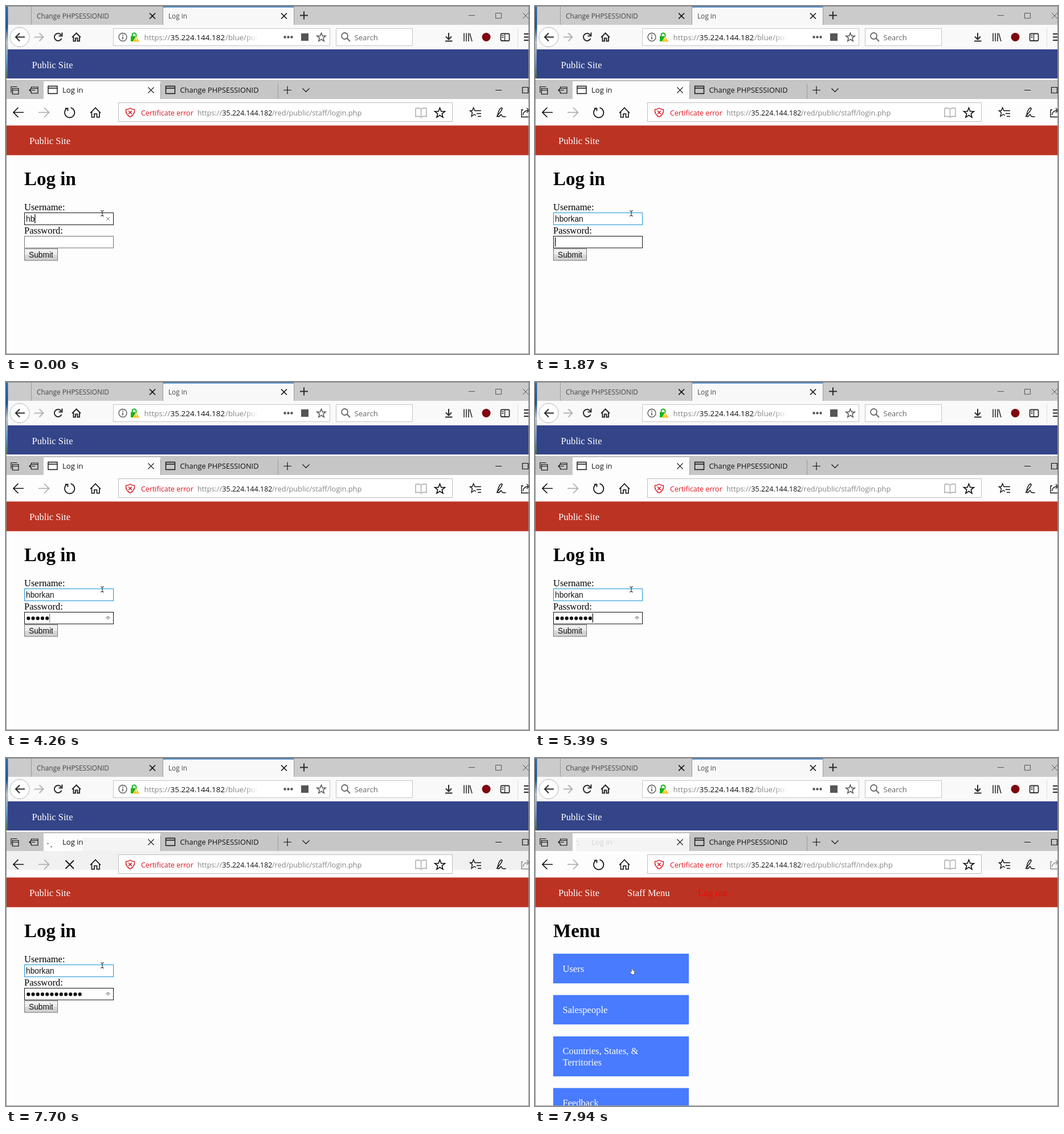
An HTML page that plays this animation: 918 px wide and 610 px high, repeating every 8 s.

```html
<!DOCTYPE html>
<html lang="en">
<head>
<meta charset="utf-8">
<title>Log in</title>
<style>
html, body { margin: 0; width: 100%; height: 100%; overflow: hidden; background: #fdfdfd; }
svg { display: block; width: 918px; height: 610px; }
text { font-family: "Open Sans", "Noto Sans", sans-serif; font-size: 12.7px; fill: #111; white-space: pre; }
.page text { font: 16.5px "Liberation Serif", serif; fill: #000; }
.page .nav, .page .nav text { fill: #fff; }
.page .h1 { font-size: 33px; font-weight: bold; }
.page .field { font: 13.75px "Liberation Sans", sans-serif; fill: #111; }
.small { font-size: 11.8px; }
.icon { fill: none; stroke: #111; stroke-width: 1.4; }
.bold { stroke-width: 2; stroke: #2b2b2b; }
.pale { stroke: #a8a8a8; }
.url { fill: #858585; }
</style>
</head>
<body>
<svg viewBox="0 0 918 610">
  <defs>
    <linearGradient id="desk" x2="0" y2="1">
      <stop stop-color="#2a6ba5"/><stop offset=".3" stop-color="#1d4f86"/>
      <stop offset=".5" stop-color="#b9c6d0"/><stop offset=".8" stop-color="#5b8fc4"/><stop offset="1" stop-color="#4c6a4a"/>
    </linearGradient>
    <linearGradient id="fade"><stop offset=".45" stop-color="#fff" stop-opacity="0"/><stop offset="1" stop-color="#fff"/></linearGradient>
    <linearGradient id="btn" x2="0" y2="1">
      <stop stop-color="#f2f2f2"/><stop offset=".5" stop-color="#ebebeb"/><stop offset=".5" stop-color="#dadada"/><stop offset="1" stop-color="#cfcfcf"/>
    </linearGradient>
    <path id="star" d="M0-9 2.4-2.9 8.9-2.8 3.8 1.3 5.5 7.6 0 4-5.5 7.6-3.8 1.3-8.9-2.8-2.4-2.9Z"/>
    <path id="cross" d="M-5-5 5 5M5-5-5 5"/>
    <path id="tabicon" d="M-8-6.5H8V6.5H-8ZM-8-3H8"/>
  </defs>

  <!-- back window -->
  <rect width="918" height="130" fill="#fcfcfc"/>
  <rect x="3" width="915" height="33" fill="#cbcbcb"/>
  <rect x="3" y="33" width="915" height="43" fill="#f9f9f9"/>
  <rect width="3.5" height="127" fill="url(#desk)"/>
  <rect x="276" y="1" width="229" height="33" fill="#f8f8f8"/>
  <rect x="276" y="0" width="229" height="2.5" fill="#2f78c4"/>
  <path d="M44.5 1V33M275.5 1V33M505.5 1V33" stroke="#9c9c9c"/>
  <text x="54" y="22" class="small" fill="#333" style="fill:#444">Change PHPSESSIONID</text>
  <text x="285" y="22" class="small" style="fill:#444">Log in</text>
  <g class="icon">
    <use href="#cross" x="257" y="17.5" stroke-width="1.7"/>
    <use href="#cross" x="488" y="17.5" stroke-width="1.7"/>
    <path d="M516 16.5H530M523 9.5V23.5" class="bold"/>
    <path d="M812 16.5H823M859.5 12.5H869.5V21.5H859.5ZM907 12 917 22M917 12 907 22" stroke="#555" stroke-width="1"/>
    <circle cx="24" cy="54.5" r="17" fill="#fff" stroke="#b5b5b5" stroke-width="1"/>
    <path d="M33 54.5H17M24 47.5 17 54.5 24 61.5" class="bold"/>
    <path d="M50 54.5H65M58.500 47.5 65.500 54.5 58.500 61.5" class="bold pale" style="stroke:#b5b5b5"/>
    <path d="M97 51A6.5 6.5 0 1 0 97.500 57M98.500 46.500V52.500H92.500" class="bold"/>
    <path d="M116 55 123.500 47.500 131 55M118.500 54V61.500H122V56.500H125.500V61.500H129V54" class="bold"/>
    <rect x="188.500" y="39.500" width="380" height="30" fill="#fff" stroke="#c6c6c6" stroke-width="1"/>
    <rect x="579.500" y="39.500" width="134" height="30" fill="#fff" stroke="#c6c6c6" stroke-width="1"/>
    <circle cx="205" cy="54.500" r="7" stroke="#555"/>
    <path d="M205 53.500V58.500M205 50V52" stroke="#555" stroke-width="1.700"/>
    <path d="M221.500 53V51A3.500 3.500 0 0 1 228.500 51V53" stroke="#16b318" stroke-width="2"/>
    <rect x="219" y="53" width="11" height="9" fill="#16b318" stroke="none"/>
    <path d="M228.500 53 234.500 63H222.500Z" fill="#ffbf00" stroke="#fff" stroke-width=".7"/>
    <path d="M228.500 56V60M228.500 61V62" stroke="#fff"/>
    <circle cx="594.500" cy="52.500" r="5.500" stroke="#666" stroke-width="1.800"/>
    <path d="M598.500 56.500 604 62" stroke="#666" stroke-width="2"/>
    <use href="#star" transform="translate(553.500 55) scale(.87)" stroke="#555" stroke-width="1.700"/>
    <path d="M777 47V58M772 53.500 777 58.500 782 53.500M771 61.500H783.500" class="bold"/>
    <path d="M804 47.500V62M808 47.500V62M812 47.500V62M814 48 818 62" stroke="#444" stroke-width="1.800"/>
    <rect x="868.500" y="48.500" width="15" height="12.500" rx="2" stroke="#333" stroke-width="1.800"/>
    <path d="M875.500 48V61M870.500 52H873.500M870.500 55H873.500" stroke="#333"/>
    <path d="M909 49H918M909 54.500H918M909 60H918" class="bold"/>
    <path d="M898.500 38V72" stroke="#dedede" stroke-width="1"/>
  </g>
  <g fill="#555"><circle cx="489.500" cy="54.500" r="2.200"/><circle cx="495.500" cy="54.500" r="2.200"/><circle cx="501.500" cy="54.500" r="2.200"/></g>
  <rect x="518" y="48" width="13" height="13" fill="#555"/>
  <circle cx="843" cy="54.500" r="7.500" fill="#800610"/>
  <text x="242.500" y="60" class="url" style="font-size:13.400px">https://</text>
  <text x="288.500" y="60" style="font-size:13.500px">35.224.144.182</text>
  <text x="385" y="60" class="url" style="font-size:13.300px">/blue/pub</text>
  <rect x="400" y="42" width="42" height="26" fill="url(#fade)"/>
  <rect x="442" y="42" width="40" height="26" fill="#fff"/>
  <text x="611.500" y="60" style="font-size:13.100px;fill:#666">Search</text>
  <rect x="3" y="76" width="915" height="51" fill="#334488"/>
  <g class="page"><text class="nav" x="45.500" y="109">Public Site</text></g>

  <!-- front window -->
  <rect y="130" width="918" height="33" fill="#c6c6c6"/>
  <rect y="163" width="918" height="447" fill="#fdfdfd"/>
  <rect x="66" y="132" width="205" height="32" fill="#fdfdfd"/>
  <rect id="tabShade" y="140" height="24"/>
  <rect id="barShade" y="163" height="33"/>
  <path d="M0 130.500H918" stroke="#b4b4b4"/>
  <path d="M271.500 136V163M477.500 136V163" stroke="#9b9b9b"/>
  <rect x="197.500" y="169.500" width="586" height="33" fill="#fff" stroke="#bdbdbd"/>
  <text id="title" x="99" y="152" style="font-size:13.100px">Log in</text>
  <text x="305.500" y="152" style="font-size:12.850px">Change PHPSESSIONID</text>
  <text x="237" y="191.500" style="font-size:12.450px;fill:#d9141e">Certificate error</text>
  <text x="336" y="191.500" class="url">https://</text>
  <text x="379.500" y="191.500" style="font-size:12.400px">35.224.144.182</text>
  <text id="path" x="467" y="191.500" class="url" style="font-size:12.800px"></text>
  <g class="icon">
    <path d="M11.500 144.500H22V154.500H11.500ZM11.500 147.500H22M9 152V141.500H19.500" stroke-width="1.200"/>
    <path d="M44.500 145V142H56V153H44.500V150M44.500 144.500H56M41 147.500H51M44 144.500 41 147.500 44 150.500" stroke-width="1.200"/>
    <use id="favicon" href="#tabicon" x="82" y="147"/>
    <use href="#tabicon" x="288.500" y="147"/>
    <use href="#cross" x="254.500" y="147.500" stroke-width="1.200"/>
    <path d="M487 147.500H501M494 140.500V154.500M520.500 144.500 526.500 150.500 532.500 144.500M859 147.500H870M906.500 142.500H916.500V152.500H906.500Z" stroke-width="1.200"/>
    <path d="M31 186.500H13M21.500 178 13 186.500 21.500 195" stroke-width="1.700"/>
    <path d="M57 186.500H75.500M67 178 75.500 186.500 67 195" class="pale" stroke-width="1.500"/>
    <path id="reload" d="M107 179.500A8.700 8.700 0 1 0 113.500 178.300M104 179.300H108.500V184" stroke-width="1.700"/>
    <path id="stop" d="M104.500 179.500 119 194M119 179.500 104.500 194" stroke-width="1.800"/>
    <path d="M148 187.500 157 178.500 166 187.500M150.500 185.500V195H155V189H159.500V195H164V185.500" stroke-width="1.600"/>
    <path d="M218 179Q221.500 181.500 225.500 181.500Q226.500 190 218 194.500Q209.500 190 210.500 181.500Q214.500 181.500 218 179ZM215 183.500 221 189.500M221 183.500 215 189.500" stroke="#d9141e"/>
    <path d="M728.500 180.500Q724 177.500 719 179.500V194Q724 192 728.500 195Q733 192 738 194V179.500Q733 177.500 728.500 180.500V195" class="pale"/>
    <use href="#star" x="761.500" y="187.500" stroke-width="1.600"/>
    <path d="M825 183.500H834M826 188.500H834M828 193.500H834M825 183.500H823L820.500 178 818.500 183.500H814.500L818.500 187 817 193.500 822 190 825 192"/>
    <path d="M861 194C866 188 871 183 871 179.500C869 176 864 183 863 191C862 196 866 194 868 191C870 188 870 194 872 194H877.500" stroke-width="1.500"/>
    <path id="share" d="M908 182H905V194.500H918M907.500 191C908 185 912 183 918 183M914 179 918 183 914 187"/>
  </g>
  <g id="spinner"><circle r="1.300"/><circle r="1.300"/></g>

  <g class="page">
    <rect y="209.500" width="918" height="52" fill="#bb3322"/>
    <text class="nav" x="41" y="242">Public Site</text>
    <g id="login">
      <text class="h1" x="32" y="314">Log in</text>
      <text x="32" y="358">Username:</text>
      <rect id="userBox" x="32.500" y="362.500" width="156" height="21" fill="#fff"/>
      <text id="user" class="field" x="35" y="378"></text>
      <path id="clear" class="icon" d="M176 370 182 376M182 370 176 376" style="stroke:#777;stroke-width:1"/>
      <text x="32" y="399">Password:</text>
      <rect id="passBox" x="32.500" y="403.500" width="156" height="20.500" fill="#fff"/>
      <g id="dots" fill="#111"></g>
      <g id="eye"><path class="icon" d="M175 414Q179 408 183 414" style="stroke:#7d8794;stroke-width:1"/><circle cx="179" cy="414" r="1.700" fill="none" stroke="#7d8794"/></g>
      <rect id="caret" width="1.200" height="16"/>
      <rect x="32.500" y="425.500" width="58" height="20.500" fill="url(#btn)" stroke="#757575"/>
      <text class="field" x="40" y="441">Submit</text>
      <path class="icon" d="M166 359H168L169 360 170 359H172M169 360V367M166 368H168L169 367 170 368H172" style="stroke-width:1"/>
    </g>
    <g id="menu">
      <text class="nav" x="162" y="242">Staff Menu</text>
      <text x="286" y="242" style="fill:#f00">Log out</text>
      <text class="h1" x="32" y="314">Menu</text>
      <path d="M32 343H270V395H32ZM32 415.500H270V467H32ZM32 488H270V558H32ZM32 578.500H270V610H32Z" fill="#487bff"/>
      <g class="nav">
        <text x="48.500" y="375">Users</text>
        <text x="48.500" y="447">Salespeople</text>
        <text x="48.500" y="519">Countries, States, &amp;</text>
        <text x="48.500" y="538.500">Territories</text>
        <text x="48.500" y="610">Feedback</text>
      </g>
      <path d="M169.500 369V375L168 373.500 167 375 170 379.500H174L175 373.500 171.500 372V369Z" fill="#fff" stroke="#333" stroke-width=".6"/>
    </g>
  </g>
  <path d="M0 .5H918M.5 128V610M917.500 0V610" fill="none" stroke="#8a8a8a"/>
  <path d="M0 609.500H918" stroke="#9a9a9a"/>
</svg>
<script>
const LOOP = 8000, FOCUS = 1870, SUBMIT = 7430, MENU = 7820, FADE = 7940;
const NAME = "hborkan", DOT = 8.22;
const $ = id => document.getElementById(id);
const set = (el, attrs) => { for (const k in attrs) el.setAttribute(k, attrs[k]); };
const show = (id, on) => { $(id).style.display = on ? "" : "none"; };

// Value of the last [time, value] step already reached
const at = (steps, t, first) => steps.reduce((v, s) => t >= s[0] ? s[1] : v, first);

const nameSteps = [[120, 3], [510, 5], [640, 7]];
const keyTimes = [2270, 2540, 2660, 2970, 3820, 4690, 5120, 5390, 6610, 6880, 7000, 7150];
const caretSteps = [[1050, .5], [1190, 0], [1620, 1], [3400, .5], [3550, 0], [3820, 1], [4260, .5],
  [4410, 0], [4690, 1], [5790, .5], [5910, 0], [6340, 1], [7550, .5], [7700, 0]];
const spinSteps = [[7550, [82, 155, 86, 152]], [7700, [73.500, 150, 79.500, 155.500]],
  [7820, [74, 146, 74, 152]], [7940, [74, 146, 76, 152]]];

const dots = keyTimes.map((_, i) => {
  const c = document.createElementNS("http://www.w3.org/2000/svg", "circle");
  set(c, { cx: 35.2 + DOT * (i + .5), cy: 414.2, r: 3.1 });
  return $("dots").appendChild(c);
});

function draw() {
  const t = performance.now() % LOOP;
  const inPass = t >= FOCUS, loading = t >= SUBMIT, menu = t >= MENU, fading = t >= FADE;
  const typed = keyTimes.filter(k => t >= k).length;

  $("user").textContent = NAME.slice(0, at(nameSteps, t, 2));
  dots.forEach((d, i) => { d.style.display = i < typed ? "" : "none"; });
  set($("userBox"), { stroke: inPass ? "#1794d2" : "#111" });
  set($("passBox"), { stroke: inPass ? "#111" : "#707070" });
  show("clear", !inPass);
  show("eye", typed > 0);
  show("login", !menu);
  show("menu", menu);
  if (!menu) set($("caret"), {
    x: inPass ? 35 + DOT * typed : 35 + $("user").getComputedTextLength(),
    y: inPass ? 405.5 : 365,
    opacity: at(caretSteps, t, 1)
  });

  show("favicon", !loading);
  show("spinner", loading);
  show("stop", loading && !menu);
  show("reload", !loading || menu);
  const [x1, y1, x2, y2] = at(spinSteps, t, [86, 143, 89, 147]);
  set($("spinner").children[0], { cx: x1, cy: y1 });
  set($("spinner").children[1], { cx: x2, cy: y2 });
  set($("spinner"), { fill: fading ? "#ddd" : "#777" });
  $("title").style.fill = fading ? "#d6d6d6" : "";
  set($("share"), { opacity: t >= 7550 ? .45 : 1 });

  const shaded = t >= 7550;
  const tabX = fading ? 72 : 135;
  show("tabShade", shaded);
  show("barShade", shaded);
  set($("tabShade"), { x: tabX, width: 271 - tabX, fill: "#f4f4f4" });
  const barX = fading ? 784 : menu ? 627 : 0;
  set($("barShade"), { x: barX, width: 918 - barX, fill: menu ? "#f7f7f7" : "#f1f1f1" });
  $("path").textContent = `/red/public/staff/${menu ? "index" : "login"}.php`;
  requestAnimationFrame(draw);
}
draw();
</script>
</body>
</html>
```
